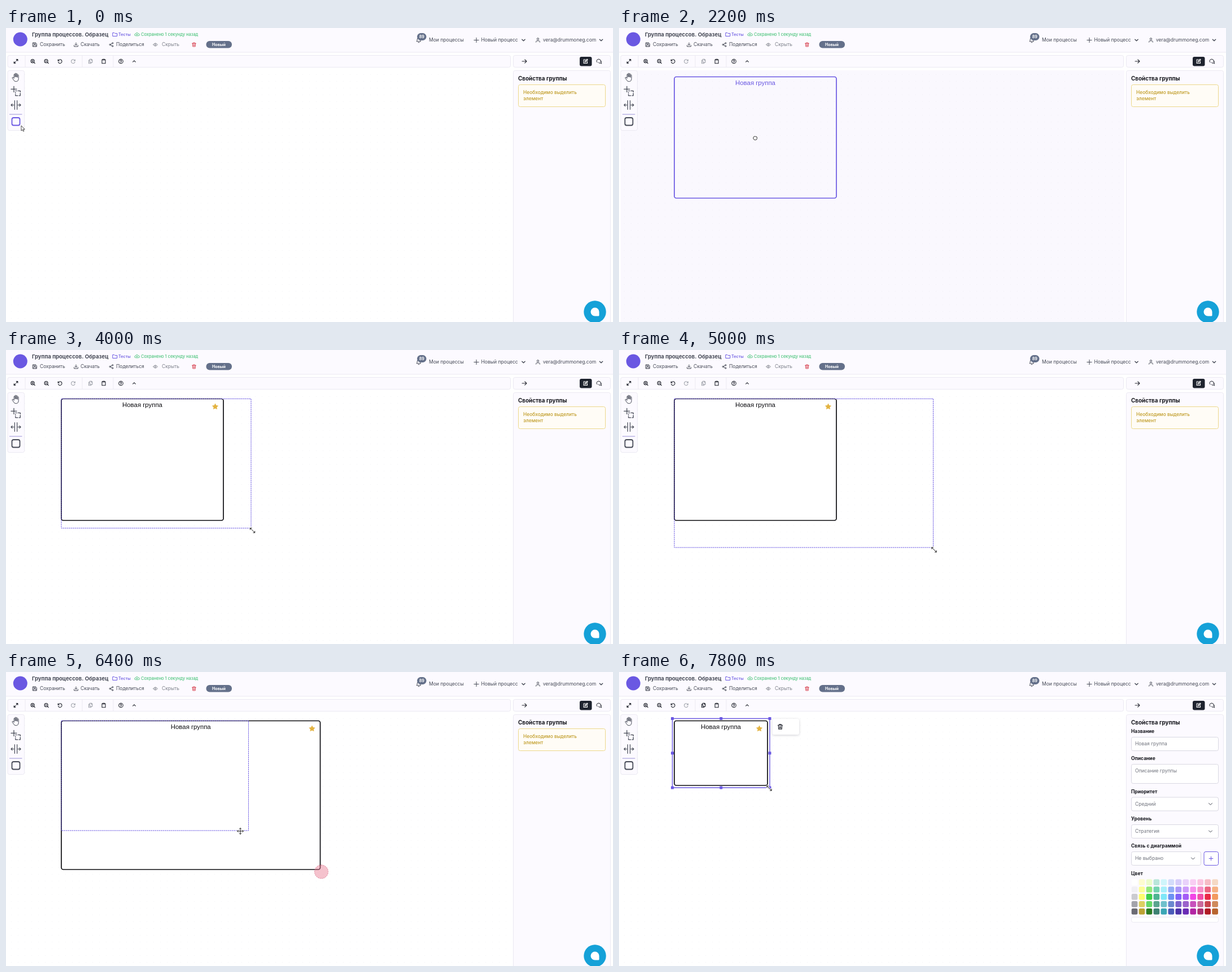
These frames come from a looping animation (1075x521 px, 8000 ms). An HTML page with a canvas:

```html
<!DOCTYPE html>
<html lang="ru">
<head>
<meta charset="utf-8">
<title>Редактор групп</title>
<style>
html, body { margin: 0; width: 100%; height: 100%; overflow: hidden; background: #fff; }
canvas { display: block; width: 1075px; height: 521px; }
</style>
</head>
<body>
<canvas id="stage"></canvas>
<script>
const W = 1075, H = 521, LOOP = 8000, STEP = 200;
const canvas = document.getElementById('stage');
const ctx = canvas.getContext('2d');
const dpr = window.devicePixelRatio || 1;
canvas.width = Math.round(W * dpr);
canvas.height = Math.round(H * dpr);

const PURPLE = '#6a58e2', INK = '#454955', DARK = '#22252e', DIM = '#a3a6ae';
const PANEL = '#fcfaff', EDGE = '#ebe9f2', SLATE = '#64708a', FIELD = '#d9d8e2';

const ICONS = {
  save: 'M3 3h13l5 5v13H3zM7 3v6h8V3M7 21v-8h10v8',
  download: 'M12 3v12M7 10l5 5 5-5M3 15v6h18v-6',
  share: 'M9 12a3 3 0 1 1-6 0 3 3 0 0 1 6 0M21 5a3 3 0 1 1-6 0 3 3 0 0 1 6 0M21 19a3 3 0 1 1-6 0 3 3 0 0 1 6 0M8.6 13.5l6.8 4M15.4 6.5l-6.8 4',
  eye: 'M2 12q10-14 20 0q-10 14-20 0M15 12a3 3 0 1 1-6 0 3 3 0 0 1 6 0',
  trash: 'M3 6h18M8 6V3h8v3M5 6l1 15h12l1-15M10 11v6M14 11v6',
  folder: 'M2 4h7l3 3h10v13H2z',
  cloud: 'M7 18H6a4.5 4.5 0 0 1-1-9a7 7 0 0 1 13-1a5 5 0 0 1 1 10h-2M12 20v-9M8 14l4-4 4 4',
  bell: 'M4 17h16q-2-2-2-8a6 6 0 0 0-12 0q0 6-2 8M10 21h4',
  plus: 'M12 3v18M3 12h18',
  down: 'M4 8l8 8 8-8',
  up: 'M4 16l8-8 8 8',
  user: 'M16 7a4 4 0 1 1-8 0 4 4 0 0 1 8 0M4 21v-2a4 4 0 0 1 4-4h8a4 4 0 0 1 4 4v2',
  expand: 'M14 10l7-7M14 3h7v7M10 14l-7 7M3 14v7h7',
  zoomIn: 'M19 11a8 8 0 1 1-16 0 8 8 0 0 1 16 0M22 22l-5-5M11 8v6M8 11h6',
  zoomOut: 'M19 11a8 8 0 1 1-16 0 8 8 0 0 1 16 0M22 22l-5-5M8 11h6',
  undo: 'M3 4v6h6M4 9a9 9 0 1 1 0 7',
  redo: 'M21 4v6h-6M20 9a9 9 0 1 0 0 7',
  copy: 'M9 2h8l4 4v11H9zM16 2v5h5M9 7H4v15h11v-5',
  clip: 'M8 4H4v18h16V4h-4M8 2h8v4H8z',
  help: 'M22 12a10 10 0 1 1-20 0 10 10 0 0 1 20 0M9 9.5a3 3 0 1 1 4 3q-1 .5-1 2M12 17v.5',
  right: 'M2 12h20M14 4l8 8-8 8',
  edit: 'M11 4H3v17h17v-8M9 15l1-5 9-8 3 3-9 9z',
  talk: 'M4 17a9 8 0 1 1 13-1M9 17q4 5 10 3l3 2-1-4q3-6-3-9',
  hand: 'M7 14V5q0-2 1.500-2T10 5v6V3q0-2 1.500-2T13 3v8V4q0-2 1.500-2T16 4v8V7q0-2 1.500-2T19 7v8q0 8-7 8q-4 0-6-4l-4-6q1-2 3-1z',
  fist: 'M5 8q1-4 4-3q2-3 4 0q3-2 4 1q4-1 4 4v4q0 7-8 7q-7 0-9-6q-2-5 1-7z',
  lasso: 'M7 0v14M0 7h14M11 11h3M17 11h6v3M23 17v6h-3M17 23h-6v-3M11 17v-2',
  space: 'M9 1v22M15 1v22M7 12H0M3 9l-3 3 3 3M17 12h7M21 9l3 3-3 3',
  resize: 'M3 3l18 18M3 9V3h6M15 21h6v-6',
  move: 'M12 2v20M2 12h20M9 5l3-3 3 3M9 19l3 3 3-3M5 9l-3 3 3 3M19 9l3 3-3 3'
};

const SWATCHES = [
  '#fff #fdfcd0 #ecfccb #b9e6da #cff5fb #d3dcfa #d6ccfa #e9d2fb #f9cdf3 #fbc4e0 #f6bcc6 #f5d9c4',
  '#f1f0f5 #fdfd97 #94e87c #74d3b0 #a8effa #92aef5 #aa97f8 #cc9bfa #f792ec #f78fc8 #ec6480 #f6b183',
  '#cbcbd0 #fdfd6e #3dcf4a #4eb492 #7fe7f8 #6c92f2 #8062f8 #a45cf6 #f244e6 #f24da8 #ea2a48 #f29a5e',
  '#a3a3ab #ddd062 #66d868 #5aa48e #70c0cc #6a88cf #7c62cc #9a62cc #c850bc #cb6a9c #c8454f #cf8a5c',
  '#6b6b73 #bca233 #2b7d24 #3d8272 #3ba6b5 #4a5bb8 #4b32a8 #6a2bb5 #b325a3 #ae3170 #b01c24 #b8652f'
].map(row => row.split(' '));

// Tracks: [time, x, y]
const CURSOR = [[0, 27, 173], [200, 32, 175], [1400, 183, 195], [2200, 241, 195], [2600, 241, 195],
  [3400, 388, 306], [3600, 388, 306], [5000, 558, 354], [5800, 558, 354], [6400, 415, 282], [7200, 266, 206]];
const PLACE = [[400, -75, 72], [1400, 36.500, 85.500], [2200, 98, 86.500]];
const CORNER = [[3600, 385, 302], [5000, 556.500, 350], [5800, 556.500, 350], [6400, 429.500, 281], [7200, 263, 201]];

function track(points, t) {
  let a = points[0];
  for (const b of points) {
    if (t < b[0]) {
      const k = Math.max(0, (t - a[0]) / (b[0] - a[0] || 1));
      return [a[1] + (b[1] - a[1]) * k, a[2] + (b[2] - a[2]) * k];
    }
    a = b;
  }
  return [a[1], a[2]];
}

function box(x, y, w, h, r, fill, stroke, line = 1) {
  ctx.beginPath();
  ctx.roundRect(x, y, w, h, r);
  if (fill) { ctx.fillStyle = fill; ctx.fill(); }
  if (stroke) { ctx.strokeStyle = stroke; ctx.lineWidth = line; ctx.stroke(); }
}

function disc(x, y, r, fill) {
  ctx.beginPath();
  ctx.arc(x, y, r, 0, Math.PI * 2);
  ctx.fillStyle = fill;
  ctx.fill();
}

function text(str, x, y, size = 8.5, color = INK, weight = 400, align = 'left', family = 'Inter, sans-serif') {
  ctx.font = `${weight} ${size}px ${family}`;
  ctx.textAlign = align;
  ctx.textBaseline = 'alphabetic';
  ctx.fillStyle = color;
  ctx.fillText(str, x, y + size * 0.35);
}

function icon(name, x, y, size = 9, color = INK, line = 1, fill) {
  const path = new Path2D(ICONS[name]), k = size / 24;
  ctx.save();
  ctx.translate(x - size / 2, y - size / 2);
  ctx.scale(k, k);
  ctx.lineCap = ctx.lineJoin = 'round';
  ctx.lineWidth = line / k;
  ctx.strokeStyle = color;
  if (fill) { ctx.fillStyle = fill; ctx.fill(path); }
  ctx.stroke(path);
  ctx.restore();
}

function header() {
  ctx.fillStyle = PANEL;
  ctx.fillRect(0, 0, W, 43);
  ctx.fillStyle = EDGE;
  ctx.fillRect(0, 42.500, W, 1);
  disc(25.3, 20, 12.500, PURPLE);
  text('Группа процессов. Образец', 46, 11.500, 9.55, INK, 700);
  icon('folder', 193, 11.500, 9, PURPLE);
  text('Тесты', 199, 11.500, 7.3, PURPLE, 500);
  icon('cloud', 232, 11.500, 9, '#4cc47c');
  text('Сохранено 1 секунду назад', 239, 11.500, 7.45, '#4cc47c', 500);
  icon('save', 51, 29.500);
  text('Сохранить', 60, 29.500);
  icon('download', 124, 29.500);
  text('Скачать', 132, 29.500);
  icon('share', 186.500, 29.500);
  text('Поделиться', 195, 29.500);
  icon('eye', 264.500, 29.500, 9, '#7d808a');
  text('Скрыть', 276, 29.500, 8.5, '#7d808a');
  icon('trash', 333, 29.500, 9, '#d94a58');
  box(354.500, 23, 45.500, 12.500, 6, SLATE);
  text('Новый', 377, 29.500, 7.1, '#fff', 700, 'center');
  icon('bell', 731, 21.500, 11);
  box(728, 9, 16.500, 13, 6.500, SLATE);
  text('89', 736.2, 15.500, 7, '#fff', 700, 'center');
  text('Мои процессы', 749, 21.500, 8.55);
  icon('plus', 833, 21.500, 11);
  text('Новый процесс', 841.500, 21.500, 8.55);
  icon('down', 916.500, 21.500, 8, INK, 1.4);
  icon('user', 942, 21.500, 10);
  text('vera@drummoneg.com', 951, 21.500);
  icon('down', 1054, 21.500, 8, INK, 1.4);
}

function toolbar(selected) {
  box(3, 48.500, 890.500, 21, 3, PANEL, EDGE);
  for (const x of [33.500, 134.500, 189.500]) {
    ctx.fillStyle = EDGE;
    ctx.fillRect(x, 49, 1, 20);
  }
  const tools = [['expand', 17.500], ['zoomIn', 47.500], ['zoomOut', 71.500], ['undo', 95.500], ['redo', 119],
    ['copy', 149.500], ['clip', 173], ['help', 203.500], ['up', 227]];
  for (const [name, x] of tools) {
    const off = name === 'redo' || (name === 'copy' && !selected);
    icon(name, x, 59, name === 'up' ? 7 : 9, off ? DIM : DARK, 1.1);
  }
  box(898.500, 48.500, 172, 21, 3, PANEL, EDGE);
  icon('right', 918, 59, 9.5, DARK, 1.1);
  box(1016, 51, 21.500, 16.500, 3, '#1e232e');
  icon('edit', 1026.500, 59, 9, '#fff', 1.1);
  icon('talk', 1050.500, 59, 10, DARK);
}

function field(label, y, value, h = 24, w = 154, arrow) {
  text(label, 907, y, 8.5, '#15161c', 700);
  box(907.500, y + 10, w, h, 3, '#fff', FIELD);
  text(value, 914, y + 22, 8.55, '#70737d');
  if (arrow) icon('down', 907 + w - 13.500, y + 22, 9, INK);
}

function sidePanel(selected) {
  box(898.500, 75.500, 172, 460, 3, PANEL, EDGE);
  text('Свойства группы', 907, 89.500, 9.9, '#15161c', 700);
  if (!selected) {
    box(907.500, 100.500, 154, 39, 3, '#fffcf6', '#ecd88a');
    text('Необходимо выделить', 916, 114.500, 8.4, '#bf9a22', 500);
    text('элемент', 916, 125.500, 8.4, '#bf9a22', 500);
    return;
  }
  field('Название', 105.500, 'Новая группа');
  field('Описание', 153.500, 'Описание группы', 34);
  field('Приоритет', 212, 'Средний', 24, 154, true);
  field('Уровень', 260.500, 'Стратегия', 24, 154, true);
  field('Связь с диаграммой', 308.500, 'Не выбрано', 24, 123, true);
  box(1036, 318.500, 25.500, 24, 3, '#fff', PURPLE);
  icon('plus', 1048.500, 330.500, 9, PURPLE);
  text('Цвет', 907, 357, 8.5, '#15161c', 700);
  SWATCHES.forEach((row, j) => row.forEach((c, i) =>
    box(907.700 + i * 12.96, 367.2 + j * 12.95, 10.700, 10.700, 2.500, c)));
  box(907.500, 434.500, 154, 9, 3, '#fff', EDGE);
}

function palette(hover) {
  box(3, 75.500, 29.500, 106, 3, PANEL, EDGE);
  icon('hand', 17.500, 87.500, 16, INK);
  icon('lasso', 17.500, 112, 17, INK, 1.3);
  icon('space', 17.500, 136.500, 17, INK, 1.2);
  ctx.fillStyle = '#9c93d8';
  ctx.fillRect(6, 152.500, 22.500, 1);
  box(10.500, 159, 14, 13.500, 3, null, hover ? PURPLE : INK, 1.8);
}

function star(x, y, r) {
  ctx.beginPath();
  for (let i = 0; i < 10; i++) {
    const a = i * Math.PI / 5 - Math.PI / 2, d = i % 2 ? r * 0.5 : r;
    ctx.lineTo(x + d * Math.cos(a), y + d * Math.sin(a));
  }
  ctx.closePath();
  ctx.fillStyle = '#e3b341';
  ctx.fill();
}

function group(x, y, w, h, ghost) {
  const color = ghost ? PURPLE : '#0c0c10';
  box(x, y, w, h, 3.500, ghost ? null : '#fff', color, 1.700);
  text('Новая группа', x + w / 2, y + 10.500, 11.4, color, 400, 'center', '"Liberation Sans", Arial, sans-serif');
  if (!ghost) star(x + w - 14.500, y + 14, 6);
}

function selection(x, y, w, h) {
  const l = x - 3.500, t = y - 4, r = x + w + 4, b = y + h + 4;
  box(l, t, r - l, b - t, 0, null, PURPLE, 1.4);
  for (const px of [l, (l + r) / 2, r]) {
    for (const py of [t, (t + b) / 2, b]) {
      if (px !== (l + r) / 2 || py !== (t + b) / 2) box(px - 2.500, py - 2.500, 5, 5, 0.5, PURPLE);
    }
  }
  ctx.save();
  ctx.shadowColor = 'rgba(40,40,70,.22)';
  ctx.shadowBlur = 4;
  ctx.shadowOffsetY = 1;
  box(r + 4.500, t + 0.5, 47.500, 28, 3, '#fff');
  ctx.restore();
  icon('trash', r + 18.500, t + 14.500, 11, DARK, 1.2);
}

function workspace(t, selected) {
  const placing = t >= 400 && t < 2600;
  ctx.save();
  ctx.beginPath();
  ctx.rect(3, 75, 892, 446);
  ctx.clip();
  ctx.fillStyle = placing ? '#faf8fe' : '#fff';
  ctx.fillRect(3, 75, 892, 446);
  ctx.fillStyle = placing ? '#efedf4' : '#f2f2f5';
  for (let x = 9; x < 895; x += 12) {
    for (let y = 82; y < H; y += 12) ctx.fillRect(x, y, 1, 1);
  }
  if (placing) {
    group(...track(PLACE, t), 287, 215, true);
  } else if (t >= 2600) {
    const [r, b] = track(CORNER, t < 5200 ? 0 : t < 7600 ? 5200 : LOOP);
    const x = 98, y = 86.500;
    group(x, y, r - x, b - y);
    if (selected) selection(x, y, r - x, b - y);
    else {
      const [cx, cy] = track(CORNER, t);
      ctx.setLineDash([2.500, 1]);
      box(x, y, cx - x, cy - y, 0, null, PURPLE);
      if (t >= 5800) {
        ctx.setLineDash([2, 1.500]);
        box(546.500, 342, 24, 24, 12, 'rgba(232,120,145,.45)', 'rgba(205,85,115,.7)');
      }
      ctx.setLineDash([]);
    }
  }
  ctx.restore();
}

function cursor(t) {
  const [x, y] = track(CURSOR, t);
  if (t < 400) {
    const arrow = new Path2D(`M${x} ${y}v9l2-1.800 1.500 3 1.500-.7-1.500-3h2.700z`);
    ctx.fillStyle = '#fff';
    ctx.strokeStyle = '#222';
    ctx.lineWidth = 0.8;
    ctx.fill(arrow);
    ctx.stroke(arrow);
    return;
  }
  const name = t < 2600 ? 'fist'
    : t < 3400 || (t >= 6000 && t < 7600) ? 'move' : 'resize';
  const size = name === 'move' ? 13 : name === 'fist' ? 9 : 11;
  if (name !== 'fist') icon(name, x, y, size, '#fff', 2.600);
  icon(name, x, y, size, '#222', 1, name === 'fist' && '#fff');
}

function chatButton() {
  disc(1043, 503, 19.700, '#15a1d8');
  box(1035.500, 495.500, 15, 15, [7.500, 7.500, 1.500, 7.500], '#fff');
}

function draw(now) {
  const t = Math.floor((now % LOOP) / STEP) * STEP;
  const selected = (t >= 2600 && t < 3600) || (t >= 5200 && t < 5800) || t >= 7600;
  ctx.setTransform(dpr, 0, 0, dpr, 0, 0);
  ctx.fillStyle = '#fff';
  ctx.fillRect(0, 0, W, H);
  workspace(t, selected);
  header();
  toolbar(selected);
  palette(t < 400);
  sidePanel(selected);
  chatButton();
  cursor(t);
}

const start = performance.now();
function loop() {
  draw(performance.now() - start);
  requestAnimationFrame(loop);
}
loop();
</script>
</body>
</html>
```
